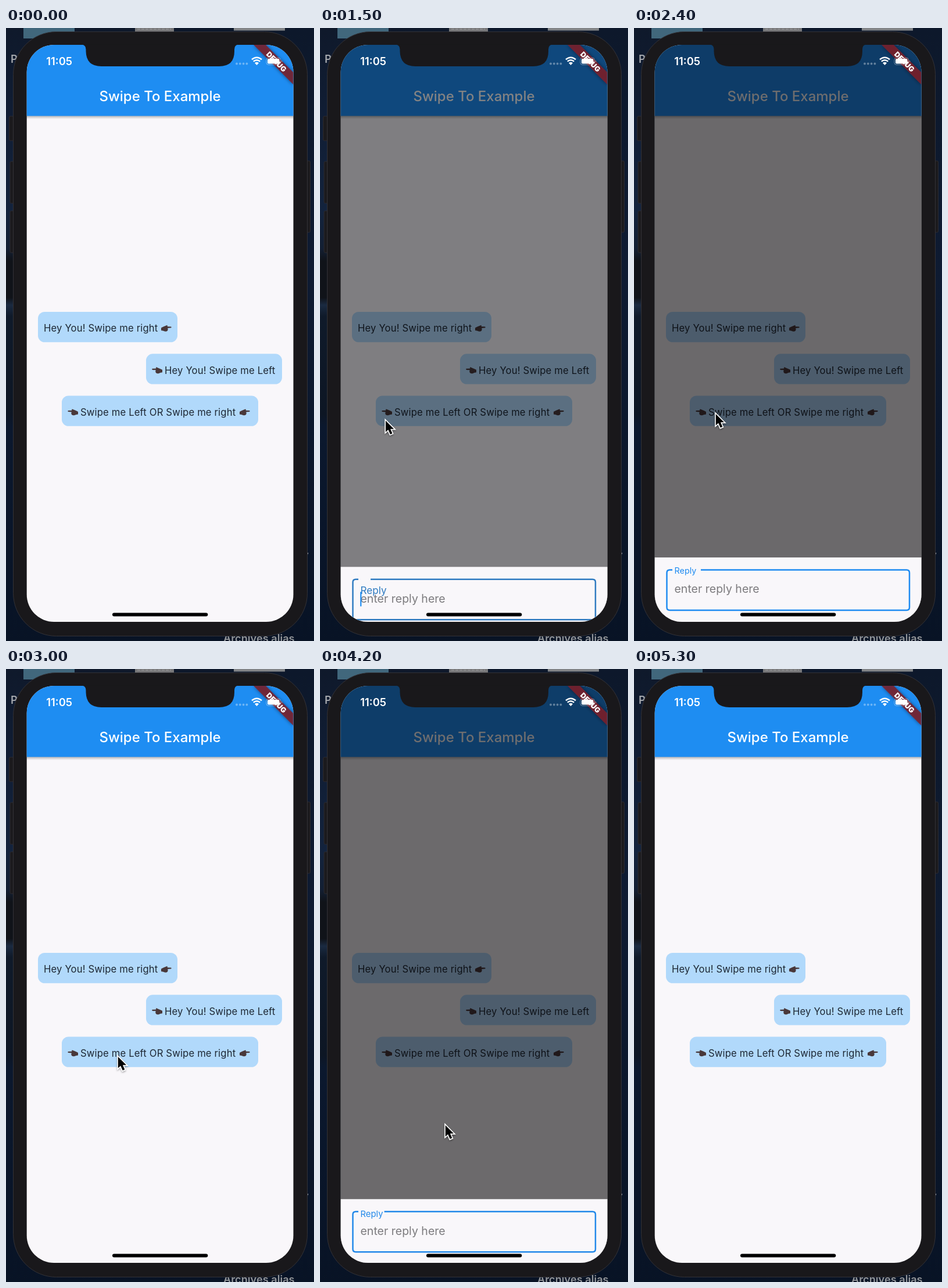
An HTML page that plays this animation: 530 by 1056 pixels, repeating every 5400 ms.

```html
<!DOCTYPE html>
<html lang="en">
<head>
<meta charset="utf-8">
<title>Swipe demo</title>
<style>
  html, body { margin: 0; width: 100%; height: 100%; overflow: hidden; background: #0b1527; }
  svg { display: block; width: 100vw; height: 100vh; }
  text { font-family: Inter, Roboto, sans-serif; }
  .msg { font-size: 16.65px; letter-spacing: .15px; fill: #1d2733; }
  .side { fill: #1b1a1d; stroke: #2c2b30; }
</style>
</head>
<body>
<svg viewBox="0 0 530 1056" xmlns="http://www.w3.org/2000/svg">
  <defs>
    <linearGradient id="sky" x2="0" y2="1">
      <stop offset="0" stop-color="#0f192b"/>
      <stop offset=".14" stop-color="#101d34"/>
      <stop offset=".3" stop-color="#13233d"/>
      <stop offset=".36" stop-color="#131f33"/>
      <stop offset=".38" stop-color="#101319"/>
      <stop offset=".44" stop-color="#101319"/>
      <stop offset=".452" stop-color="#1a2a41"/>
      <stop offset=".47" stop-color="#0f1a2a"/>
      <stop offset=".63" stop-color="#0d1624"/>
      <stop offset=".65" stop-color="#0b182e"/>
      <stop offset="1" stop-color="#081325"/>
    </linearGradient>
    <linearGradient id="skyRight" x2="0" y2="1">
      <stop offset="0" stop-color="#0d182b"/>
      <stop offset=".4" stop-color="#0e1b32"/>
      <stop offset="1" stop-color="#081325"/>
    </linearGradient>
    <linearGradient id="barShadow" x2="0" y2="1">
      <stop offset="0" stop-color="#000" stop-opacity=".28"/>
      <stop offset="1" stop-color="#000" stop-opacity="0"/>
    </linearGradient>
    <filter id="soft" x="-50%" y="-50%" width="200%" height="200%">
      <feDropShadow dx="0" dy="1.5" stdDeviation="1.5" flood-opacity=".4"/>
    </filter>
    <filter id="ribbonShadow" x="-30%" y="-30%" width="160%" height="160%">
      <feDropShadow dx="0" dy="0" stdDeviation="3" flood-opacity=".55"/>
    </filter>
    <clipPath id="screen"><rect x="35.7" y="29" width="458.8" height="994" rx="47"/></clipPath>
    <path id="hand" fill="#49383a" d="M0 5.2Q4 3 7.5 1.9L10 .8Q11.6 1 10.6 3.1L17 3.2Q18.6 4.2 17 5.4L11.2 5.8Q12.4 8.2 11 10.4Q9 12.2 6 11.4Q3 9.9 0 9.7Z"/>
  </defs>

  <!-- desktop -->
  <rect width="265" height="1056" fill="url(#sky)"/>
  <rect x="265" width="265" height="1056" fill="url(#skyRight)"/>
  <rect x="30" width="88" height="18" fill="#41677c"/>
  <path d="M222 0H289V6H222Z" fill="#777779"/>
  <path d="M226 2H284" stroke="#a0a0a1" stroke-dasharray="5 2"/>
  <rect x="392" width="88" height="4.5" fill="#828487"/>
  <g fill="#a5a8ad" font-weight="600" font-size="18.2">
    <text x="8" y="59.5">P</text>
    <text x="510" y="914">y</text>
    <text x="374" y="1057.5" fill="#929599">Archives alias</text>
  </g>

  <!-- phone -->
  <rect class="side" x="5.5" y="152" width="14" height="42" rx="2"/>
  <rect class="side" x="7" y="230" width="14" height="72" rx="2"/>
  <rect class="side" x="7" y="315" width="14" height="72" rx="2"/>
  <rect class="side" x="508" y="229" width="15.5" height="123" rx="2"/>
  <rect x="12.5" y="6.5" width="506" height="1041" rx="74" fill="#19181b" stroke="#333237"/>

  <g clip-path="url(#screen)">
    <rect x="35" y="29" width="460" height="994" fill="#f9f7fa"/>
    <rect x="35" y="151" width="460" height="6" fill="url(#barShadow)"/>
    <rect x="35" y="29" width="460" height="122.5" fill="#1e8df2"/>
    <text x="265" y="126" text-anchor="middle" font-size="24" font-weight="500" fill="#fff">Swipe To Example</text>

    <circle id="iconLeft" cx="73" cy="660" r="15" fill="#bdbdbd"/>
    <circle id="iconRight" cx="457" cy="660" r="15" fill="#bdbdbd"/>
    <g id="bubbles"></g>

    <rect id="scrim" x="35" y="29" width="460" height="994" fill="#020003"/>
    <g id="sheet">
      <rect x="35" width="460" height="115" fill="#f9f7fa"/>
      <path id="field" fill="none" stroke-width="2.5"/>
      <text x="69.5" y="61.3" font-size="19.5" fill="#7c7b7e">enter reply here</text>
      <text id="label" font-size="19.2">Reply</text>
      <rect id="caret" x="69.2" y="43" width="2.2" height="25" fill="#1e8df2"/>
    </g>

    <!-- debug ribbon -->
    <path d="M426 29H447L494.5 76.5V97.5Z" fill="#7b202b" fill-opacity=".86" filter="url(#ribbonShadow)"/>
    <text transform="translate(465.3 58.2) rotate(45)" y="4.4" text-anchor="middle" font-size="12.4" font-weight="900" fill="#fff">DEBUG</text>
  </g>

  <!-- notch and status bar -->
  <path d="M130 28.5Q137.5 29 137.5 37V40Q138 66 164 66H367Q393 66 393 40V37Q393 29 400 28.5Z" fill="#19181b"/>
  <text x="69.3" y="64" font-size="18.4" font-weight="600" fill="#fff">11:05</text>
  <g fill="#fff">
    <g opacity=".35">
      <circle cx="397" cy="61.5" r="1.9"/><circle cx="402.8" cy="61.5" r="1.9"/>
      <circle cx="408.6" cy="61.5" r="1.9"/><circle cx="414.4" cy="61.5" r="1.9"/>
    </g>
    <path d="M431.5 64L428 60.2Q431.5 57.4 435 60.2Z"/>
    <path d="M425.8 57.6Q431.5 52.8 437.2 57.6M423 54.2Q431.5 47.2 440 54.2" fill="none" stroke="#fff" stroke-width="2.5"/>
    <rect x="448" y="51.3" width="24.5" height="12" rx="3.5" fill="none" stroke="#fff" stroke-opacity=".4"/>
    <rect x="450" y="53.1" width="20.5" height="8.4" rx="2"/>
    <path d="M474 55.5Q476.5 57.3 474 59.5Z" opacity=".45"/>
  </g>
  <rect x="183" y="1007.4" width="164.3" height="6.1" rx="3"/>

  <g id="cursor" filter="url(#soft)">
    <path d="M.8 1V20.5L5.2 16.6L8.7 24.6L12.3 23.1L8.9 15.3H15Z" stroke="#fff" stroke-width="3.2" paint-order="stroke"/>
  </g>
</svg>
<script>
const LOOP = 5400;
const $ = id => document.getElementById(id);
const bubbles = [
  { x: 55, y: 489, w: 240, text: 'Hey You! Swipe me right', textX: 10, right: 212 },
  { x: 241, y: 561.3, w: 234, text: 'Hey You! Swipe me Left', textX: 32, left: 10 },
  { x: 96, y: 633.5, w: 338, text: 'Swipe me Left OR Swipe me right', textX: 32, left: 10, right: 306 }
];

$('bubbles').innerHTML = bubbles.map(b => `
  <g transform="translate(${b.x} ${b.y})">
    <rect width="${b.w}" height="52.3" rx="11.5" fill="#b1d9fb"/>
    ${b.left ? `<use href="#hand" transform="translate(${b.left + 18} 22.2) scale(-1 1)"/>` : ''}
    <text class="msg" x="${b.textX}" y="34.3">${b.text}</text>
    ${b.right ? `<use href="#hand" x="${b.right}" y="22.2"/>` : ''}
  </g>`).join('');
const swiped = $('bubbles').lastElementChild;

const linear = u => u;
const smooth = u => u * u * (3 - 2 * u);
const clamp01 = v => Math.min(1, Math.max(0, v));

// Value at time t along [time, value] keys.
function track(t, keys, ease = linear) {
  if (t <= keys[0][0]) return keys[0][1];
  for (let i = 1; i < keys.length; i++) {
    const [t0, v0] = keys[i - 1], [t1, v1] = keys[i];
    if (t <= t1) return v0 + (v1 - v0) * ease((t - t0) / (t1 - t0));
  }
  return keys[keys.length - 1][1];
}

const slideKeys = [[850, 0], [1100, -56], [1150, -58], [1350, 0], [3050, 0], [3220, 58], [3400, 0]];
const sheetKeys = [
  [1300, 0], [1500, .85], [1700, .97], [1900, 1], [2400, 1], [2700, 0],
  [3400, 0], [3550, .62], [3700, .865], [3900, .95], [4200, .986], [4350, 1], [4550, 1], [4900, 0]
];
const floatKeys = [
  [1350, 0], [1550, .57], [1850, 1], [3000, 1],
  [3001, 0], [3450, 0], [3700, .57], [4200, .91], [4350, 1]
];
const cursorX = [[300, 215], [750, 190], [1100, 84], [1300, 84], [1700, 140], [2500, 140], [2850, 192], [3050, 192], [3250, 250], [3600, 215]];
const cursorY = [[300, 720], [750, 668], [1100, 687], [1300, 687], [1700, 664], [2500, 664], [2850, 667], [3050, 667], [3250, 690], [3600, 785]];

function drawSheet(t, open, float) {
  const rest = 1 - float;
  const blue = `rgb(${30 + 30 * rest},${139 - 28 * rest},${241 - 85 * rest})`;
  $('sheet').setAttribute('transform', `translate(0 ${1023 - 111.3 * open})`);
  $('field').setAttribute('d', `M${66 + 49 * float} 21.5H469Q474 21.5 474 26.5V86Q474 91 469 91H61.5Q56.5 91 56.5 86V26.5Q56.5 21.5 61.5 21.5H66`);
  $('field').setAttribute('stroke', blue);
  const scale = 1 - .25 * float;
  $('label').setAttribute('transform', `translate(69.5 ${23 + 32 * rest + 6.5 * scale}) scale(${scale})`);
  $('label').setAttribute('fill', blue);
  $('caret').setAttribute('opacity', Math.floor((t - 1450) / 500) % 2 ? 0 : 1);
  $('scrim').setAttribute('opacity', .575 * open);
}

function render(t) {
  const dx = track(t, slideKeys, smooth);
  const { x, y } = bubbles[2];
  swiped.setAttribute('transform', `translate(${x + dx} ${y})`);
  $('iconRight').setAttribute('opacity', clamp01(-dx / 56));
  $('iconLeft').setAttribute('opacity', clamp01(dx / 56));
  drawSheet(t, track(t, sheetKeys), track(t, floatKeys));
  $('cursor').setAttribute('transform', `translate(${track(t, cursorX, smooth)} ${track(t, cursorY, smooth)})`);
  $('cursor').setAttribute('visibility', t >= 300 && t < 5000 ? 'visible' : 'hidden');
}

const start = performance.now();
function tick() {
  render((performance.now() - start) % LOOP);
  requestAnimationFrame(tick);
}
render(0);
requestAnimationFrame(tick);
</script>
</body>
</html>
```
